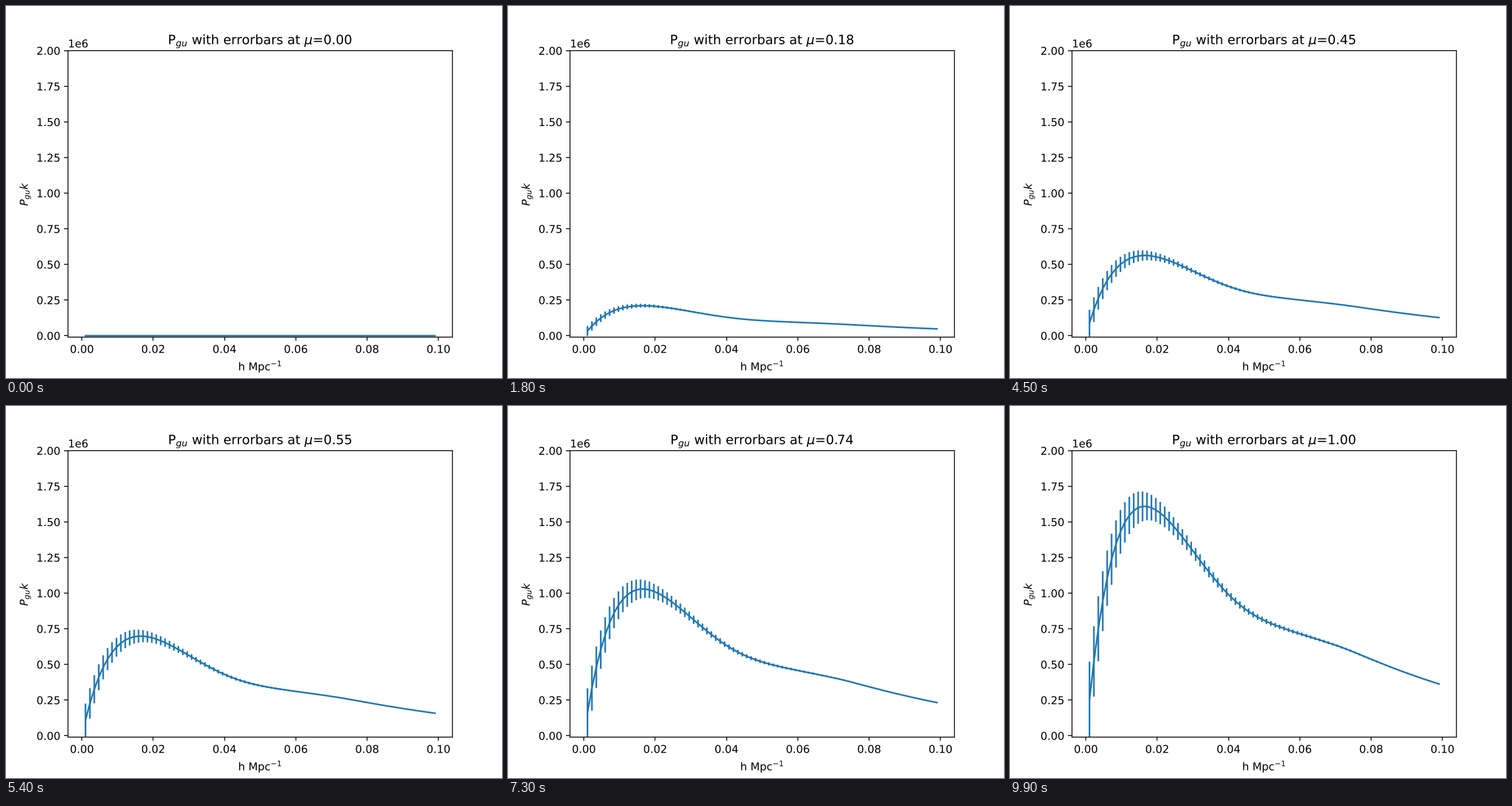
Recreate the animation shown at these times as a matplotlib script. Size 864 by 648 pixels, loop 10000 ms.

```python
import numpy as np
import matplotlib.pyplot as plt
from matplotlib.animation import FuncAnimation
from matplotlib.patheffects import Normal

FRAMES = 100
BINS = 80

# Draw text as outlines and keep sub-pixel positions for a smooth look
plt.rcParams.update({
    "path.snap": False,
    "path.effects": [Normal()],
    "text.hinting": "none",
})


def softplus(x):
    return np.logaddexp(0, x)


def spectrum(k):
    """Power times k at mu = 1: exponential falloff with two bends."""
    log_power = (5.5855 - 60.95 * k
                 + 0.1725 * softplus((k - 0.04427) / 0.005)
                 - 0.0106 * softplus((k - 0.0725) / 0.002))
    return 1e6 * k * np.exp(log_power)


def spread(n):
    """Half length of the error bar of bin n at mu = 1."""
    return 1e6 * (0.222 * np.exp(-n / 10.8) + 0.0463 * np.exp(-n / 31))


def growth(mu):
    """Amplitude relative to mu = 1."""
    return mu * (0.709 + 0.291 * mu ** 2)


k = np.linspace(0.001, 0.099, BINS)
power = spectrum(k)
error = spread(np.arange(BINS))

fig, ax = plt.subplots(figsize=(6.4, 4.8), dpi=135)
line, _, (bars,) = ax.errorbar(k, power, yerr=error)
ax.set_xlim(-0.0039, 0.1039)
ax.set_ylim(-1e4, 2e6)
ax.set_xlabel(r"h Mpc$^{-1}$")
ax.set_ylabel(r"$P_{gu}k$")
title = ax.set_title("")


def update(frame):
    mu = frame / (FRAMES - 1)
    y, dy = growth(mu) * power, growth(mu) * error
    line.set_ydata(y)
    bars.set_segments([[(x, a), (x, b)] for x, a, b in zip(k, y - dy, y + dy)])
    title.set_text(rf"P$_{{gu}}$ with errorbars at $\mu$={mu:.2f}")
    return line, bars, title


anim = FuncAnimation(fig, update, frames=FRAMES, interval=100,
                     init_func=lambda: update(0), repeat=True, repeat_delay=0)
plt.show()
```
